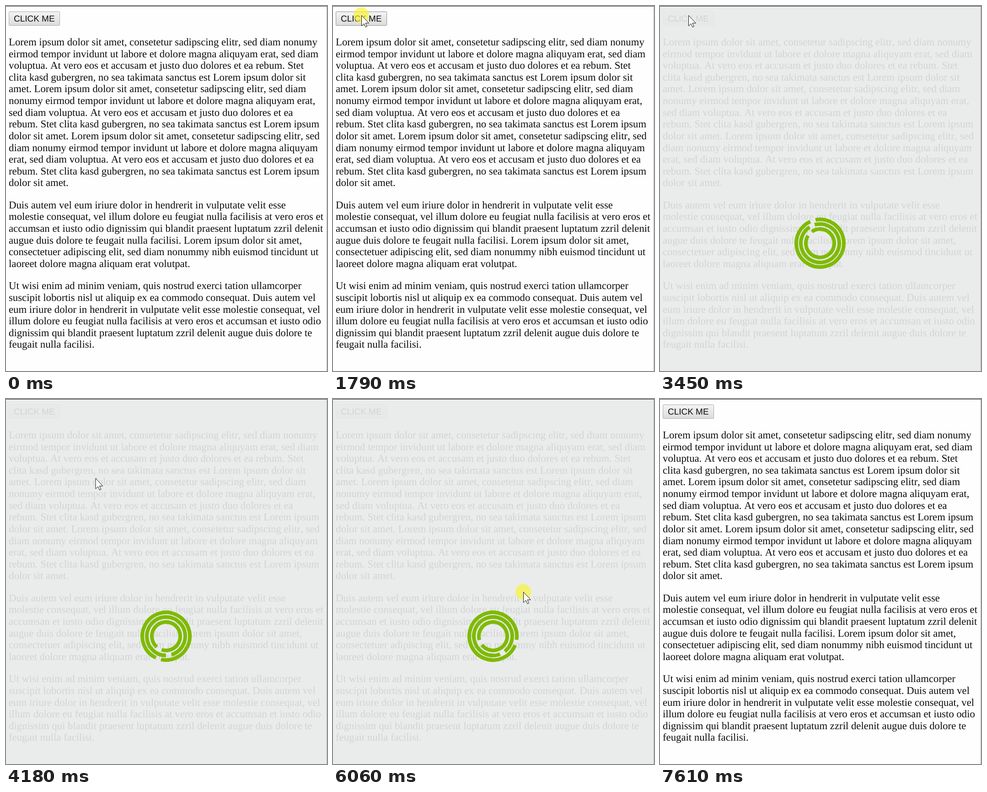
An HTML page that plays this animation: 702x797 px, repeating every 7.99 s.

```html
<!DOCTYPE html>
<html lang="la">
<head>
<meta charset="utf-8">
<title>Loading overlay</title>
<style>
html, body { margin: 0; height: 100%; overflow: hidden; background: #fff; }
svg { display: block; }
text { text-rendering: geometricPrecision; font-kerning: none; fill: #0c0c0c; }
#copy { font: 22.76px "Liberation Serif", serif; }
#button { font: 18.97px "Liberation Sans", sans-serif; }
#button rect { fill: url(#face); stroke: #a9a9a9; }
#button.hover rect { stroke: #8f8f8f; }
#rings circle { fill: none; stroke: #7fba00; stroke-width: 8; }
</style>
</head>
<body>
<svg width="702" height="797" viewBox="0 0 702 797">
  <linearGradient id="face" x2="0" y2="1">
    <stop stop-color="#f4f4f4"/><stop offset="1" stop-color="#dcdcdc"/>
  </linearGradient>
  <rect width="702" height="797" fill="#fefefe"/>
  <g id="button">
    <rect x="6.5" y="12.5" width="111" height="30" rx="1"/>
    <text x="17" y="34">CLICK ME</text>
  </g>
  <g id="copy"></g>
  <g id="overlay">
    <rect width="701" height="797" fill="#e8eae9" fill-opacity=".9"/>
    <g id="rings" transform="translate(350 518)"></g>
  </g>
  <path d="M0 .5H702" stroke="#333"/>
  <path d="M701.5 1V797" stroke="#b4b4b4"/>
  <g id="pointer">
    <circle id="click" r="17" fill="#fbf52a" fill-opacity=".65"/>
    <path d="M.5 .5V23.5L5.8 18.6L9.3 26.2L12.4 24.8L9 17.4H16.2Z" fill="#fff" stroke="#111"/>
  </g>
</svg>
<script>
const LOOP = 7990, STEP = 78.75, LINE = 25.62, PARAGRAPH_GAP = 22.76;
const ENTER = 380, PRESS = 1730, LOADING = 1950, DONE = 6140, LEAVE = 6680, GONE = 7610;

const paragraphs = [
`Lorem ipsum dolor sit amet, consetetur sadipscing elitr, sed diam nonumy
eirmod tempor invidunt ut labore et dolore magna aliquyam erat, sed diam
voluptua. At vero eos et accusam et justo duo dolores et ea rebum. Stet
clita kasd gubergren, no sea takimata sanctus est Lorem ipsum dolor sit
amet. Lorem ipsum dolor sit amet, consetetur sadipscing elitr, sed diam
nonumy eirmod tempor invidunt ut labore et dolore magna aliquyam erat,
sed diam voluptua. At vero eos et accusam et justo duo dolores et ea
rebum. Stet clita kasd gubergren, no sea takimata sanctus est Lorem ipsum
dolor sit amet. Lorem ipsum dolor sit amet, consetetur sadipscing elitr, sed
diam nonumy eirmod tempor invidunt ut labore et dolore magna aliquyam
erat, sed diam voluptua. At vero eos et accusam et justo duo dolores et ea
rebum. Stet clita kasd gubergren, no sea takimata sanctus est Lorem ipsum
dolor sit amet.`,
`Duis autem vel eum iriure dolor in hendrerit in vulputate velit esse
molestie consequat, vel illum dolore eu feugiat nulla facilisis at vero eros et
accumsan et iusto odio dignissim qui blandit praesent luptatum zzril delenit
augue duis dolore te feugait nulla facilisi. Lorem ipsum dolor sit amet,
consectetuer adipiscing elit, sed diam nonummy nibh euismod tincidunt ut
laoreet dolore magna aliquam erat volutpat.`,
`Ut wisi enim ad minim veniam, quis nostrud exerci tation ullamcorper
suscipit lobortis nisl ut aliquip ex ea commodo consequat. Duis autem vel
eum iriure dolor in hendrerit in vulputate velit esse molestie consequat, vel
illum dolore eu feugiat nulla facilisis at vero eros et accumsan et iusto odio
dignissim qui blandit praesent luptatum zzril delenit augue duis dolore te
feugait nulla facilisi.`];

const $ = id => document.getElementById(id);
const add = (parent, name, attrs) => {
  const node = document.createElementNS('http://www.w3.org/2000/svg', name);
  for (const key in attrs) node.setAttribute(key, attrs[key]);
  return parent.appendChild(node);
};
const show = (id, visible) => { $(id).style.display = visible ? '' : 'none'; };
const between = (t, from, to) => t >= from && t < to;
const progress = (t, from, to) => Math.min(1, Math.max(0, (t - from) / (to - from)));
const easeOut = power => k => 1 - (1 - k) ** power;
const smooth = k => k * k * (3 - 2 * k);

// Pointer path: from the lower edge to the button, down to the page, and out again
function pointerAt(t) {
  let x = 540, y = 782;
  const glide = (from, to, toX, toY, ease) => {
    const k = ease(progress(t, from, to));
    x += (toX - x) * k;
    y += (toY - y) * k;
  };
  glide(ENTER, 1400, 62, 20, easeOut(3));
  glide(3935, 4959, 389, 394, easeOut(2));
  glide(4980, 5200, 416, 421, smooth);
  glide(LEAVE, 7540, 637, 787, smooth);
  return `${x} ${y}`;
}

// Gap angles of a ring at a few moments, with an even spin in between
const moments = [2281, 3462, 4959, 6061];
const rings = [
  { r: 52, angles: [47, 252, 709, 1095] },
  { r: 42, angles: [187, 605, 1020, 1500] },
  { r: 31, angles: [331, 583, 1124, 1593] }];

function spin(angles, t) {
  const i = t < moments[1] ? 0 : t < moments[2] ? 1 : 2;
  const k = (t - moments[i]) / (moments[i + 1] - moments[i]);
  return angles[i] + (angles[i + 1] - angles[i]) * k;
}

let baseline = 86;
for (const paragraph of paragraphs) {
  for (const line of paragraph.split('\n')) {
    add($('copy'), 'text', { x: 6, y: baseline }).textContent = line;
    baseline += LINE;
  }
  baseline += PARAGRAPH_GAP;
}

for (const ring of rings) {
  const gap = 12.5, length = 2 * Math.PI * ring.r;
  ring.halfGap = gap / length * 180;
  ring.node = add($('rings'), 'circle', { r: ring.r, 'stroke-dasharray': `${length - gap} ${gap}` });
}

function draw(t) {
  // Motion advances in coarse, even ticks
  const tick = PRESS + STEP * Math.floor((t - PRESS + 14) / STEP);
  for (const { node, angles, halfGap } of rings)
    node.setAttribute('transform', `rotate(${spin(angles, tick) + halfGap})`);
  $('pointer').setAttribute('transform', `translate(${pointerAt(tick)})`);
  $('button').classList.toggle('hover', between(t, 1160, LOADING));
  show('pointer', between(t, ENTER, GONE));
  show('click', between(t, PRESS, LOADING) || between(t, DONE - 230, DONE));
  show('overlay', between(t, LOADING, DONE));
}

const start = performance.now();
function loop() {
  draw((performance.now() - start) % LOOP);
  requestAnimationFrame(loop);
}
loop();
</script>
</body>
</html>
```
